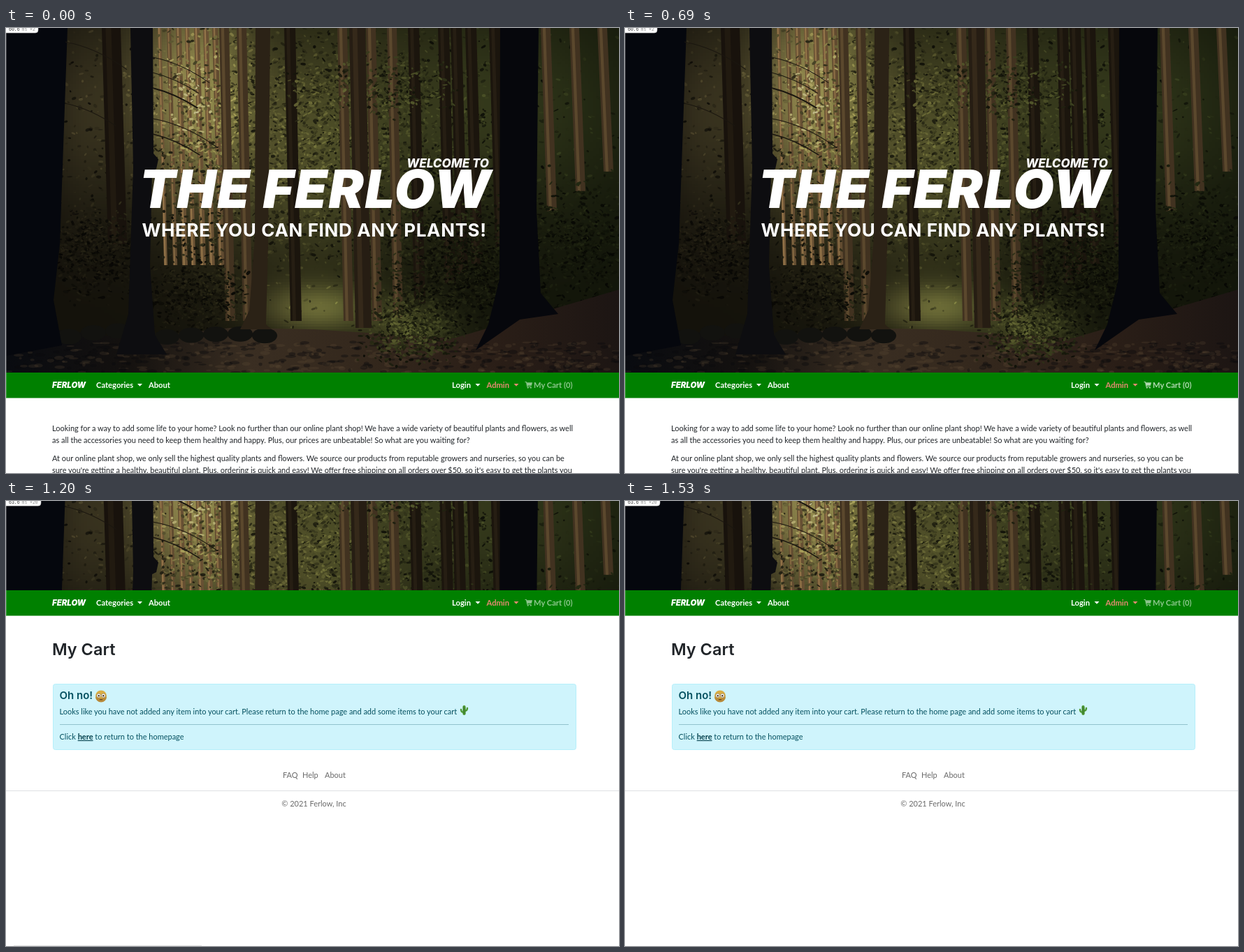
These frames come from a looping animation (877 px wide and 638 px high, 1.56 s). An HTML page with a canvas:

```html
<!DOCTYPE html>
<html lang="en">
<head>
<meta charset="utf-8">
<title>Plant shop</title>
<style>
html, body { margin: 0; width: 100%; height: 100%; overflow: hidden; background: #fff; }
canvas, svg { position: absolute; left: 0; top: 0; }
text { font: 10.97px Lato, sans-serif; white-space: pre; font-optical-sizing: none; }
.inter { font-family: Inter, sans-serif; }
.logo { font-weight: 900; font-style: italic; }
.nav text { font-size: 11.2px; font-weight: 700; }
.nav .logo { font: italic 900 11.4px Inter, sans-serif; }
.foot text { fill: #6a6a6a; }
#badge text { font: 6.5px "Liberation Mono", monospace; }
</style>
</head>
<body>
<canvas id="forest" width="877" height="494"></canvas>
<svg width="877" height="638" viewBox="0 0 877 638">
  <g id="home">
    <g fill="#fff">
      <text class="inter" x="691" y="199.5" text-anchor="end" style="font-size:17px;font-weight:800;font-style:italic">WELCOME TO</text>
      <text class="inter logo" x="443" y="257.5" text-anchor="middle" style="font-size:75px;letter-spacing:1.8px">THE FERLOW</text>
      <text class="inter" x="441" y="299" text-anchor="middle" style="font-size:26px;font-weight:700;letter-spacing:.65px">WHERE YOU CAN FIND ANY PLANTS!</text>
    </g>
    <rect y="530" width="877" height="108" fill="#fff"/>
    <g fill="#212529">
      <text x="66" y="577.5">Looking for a way to add some life to your home? Look no further than our online plant shop! We have a wide variety of beautiful plants and flowers, as well</text>
      <text x="66" y="595">as all the accessories you need to keep them healthy and happy. Plus, our prices are unbeatable! So what are you waiting for?</text>
      <text x="66" y="621">At our online plant shop, we only sell the highest quality plants and flowers. We source our products from reputable growers and nurseries, so you can be</text>
      <text x="66" y="638">sure you're getting a healthy, beautiful plant. Plus, ordering is quick and easy! We offer free shipping on all orders over $50, so it's easy to get the plants you</text>
    </g>
  </g>

  <g id="cart">
    <rect y="164" width="877" height="474" fill="#fff"/>
    <text class="inter" x="66" y="221" fill="#212529" style="font-size:23.5px;font-weight:600">My Cart</text>
    <rect x="67.5" y="262.5" width="748" height="94" rx="3" fill="#cff4fc" stroke="#b6effb"/>
    <g fill="#055160">
      <text class="inter" x="76.5" y="284" style="font-size:15px;font-weight:600">Oh no!</text>
      <text x="76.5" y="305.5">Looks like you have not added any item into your cart. Please return to the home page and add some items to your cart</text>
      <text x="76.5" y="342">Click <tspan font-weight="700" fill="#04414d" text-decoration="underline">here</tspan> to return to the homepage</text>
    </g>
    <path d="M77 320.5H805" stroke="#055160" opacity=".3"/>
    <g transform="translate(136 279.5)">
      <circle r="8" fill="#d9ad45"/>
      <path d="M-8 1A8 8 0 0 0 8 1Q0 6-8 1" fill="#b88a3a"/>
      <g fill="#fff" stroke="#7d6330" stroke-width=".6"><circle cx="-3.3" cy="-.5" r="2.9"/><circle cx="3.3" cy="-.5" r="2.9"/></g>
      <g fill="#4a3018"><circle cx="-3.2" cy="-.3" r="1.2"/><circle cx="3.2" cy="-.3" r="1.2"/><path d="M-2 4.8H2V5.7H-2Z"/></g>
    </g>
    <g fill="none" stroke="#4f9a35" stroke-linecap="round">
      <path d="M655.5 295V305" stroke-width="4.2"/>
      <path d="M655 303Q651 303 651 299M656 301Q660 301 660 297" stroke-width="2.4"/>
      <path d="M654.6 295V305M656.6 296V305" stroke="#2e6c26" stroke-width=".7"/>
    </g>
    <g class="foot">
      <text x="396" y="396.5">FAQ</text><text x="424" y="396.5">Help</text><text x="456" y="396.5">About</text>
      <text x="440.5" y="438" text-anchor="middle">© 2021 Ferlow, Inc</text>
    </g>
    <path d="M0 415.5H877" stroke="#dfe1e3"/>
    <path id="status" d="M11 637.5H280" stroke="#e2e2e2"/>
  </g>

  <g id="nav" class="nav" fill="#fff">
    <rect y="494" width="877" height="36.5" fill="#008000"/>
    <text class="logo" x="66" y="516">FERLOW</text>
    <text x="129" y="516">Categories</text><path d="M188 510h7l-3.5 3.7z"/>
    <text x="204" y="516">About</text>
    <text x="638" y="516">Login</text><path d="M671.5 510h7l-3.5 3.7z"/>
    <g fill="#e58a72"><text x="687.5" y="516">Admin</text><path d="M726.5 510h7l-3.5 3.7z"/></g>
    <g id="link">
      <path d="M742.5 507h2.2l.4 1.3h7.9l-1.1 4.5h-5.8l.2 1h5.2v1h-6.1l-1.4-6.7h-1.5z"/>
      <circle cx="746.7" cy="515.8" r="1"/><circle cx="750.9" cy="515.8" r="1"/>
      <text x="755" y="516">My Cart (0)</text>
    </g>
    <path d="M.5 0V530" stroke="#fff" opacity=".25"/>
  </g>

  <g id="badge">
    <rect id="plate" x="-6" y="-8" width="52" height="15" rx="4" fill="#fff" stroke="#bbb" stroke-width=".6"/>
    <text id="ms" x="4" y="4" fill="#333"></text>
    <text x="22.5" y="4" fill="#999">ms</text>
    <text id="count" x="34" y="4" fill="#888"></text>
  </g>
</svg>
<script>
const $ = id => document.getElementById(id);
const ctx = $('forest').getContext('2d');

let seed = 7;
const rnd = () => (seed = seed * 16807 % 2147483647) / 2147483647;
const spread = () => rnd() + rnd() + rnd() - 1.5;

// Daylight falling through the wood, as a lightness in percent
const bump = (x, y, rx, ry) => Math.exp(-((x / rx) ** 2) - (y / ry) ** 2);
const light = (x, y) => 6
  + 36 * bump(x - 265, y - 90, 85, 150)
  + 15 * bump(x - 430, y - 180, 130, 180)
  + 10 * bump(x - 680, y - 110, 200, 150)
  + 9 * bump(x - 110, y - 120, 60, 140)
  + 22 * bump(x - 445, y - 400, 80, 35)
  + 14 * bump(x - 580, y - 435, 60, 40);
const tone = (x, y, k) => `hsl(${42 + x * .04},${28 + x * .01}%,${light(x, y) * k}%)`;

function shape(fill, ...points) {
  ctx.fillStyle = fill;
  ctx.beginPath();
  for (let i = 0; i < points.length; i += 2) ctx.lineTo(points[i], points[i + 1]);
  ctx.fill();
}

function ellipse(fill, x, y, rx, ry, turn = 0) {
  ctx.fillStyle = fill;
  ctx.beginPath();
  ctx.ellipse(x, y, rx, ry, turn, 0, 7);
  ctx.fill();
}

function leaves(n, cx, cy, rx, ry) {
  while (n--) {
    const x = cx + spread() * rx, y = cy + spread() * ry;
    ellipse(tone(x, y, .3 + rnd() * 1.2), x, y, 1 + rnd() * 3, .8 + rnd() * 1.4, spread());
  }
}

function trunk(x, width, foot, lightness) {
  const lean = 9;
  const slab = (color, a, b) => shape(color, x + a, 0, x + b, 0, x + lean + b, foot, x + lean + a, foot);
  slab(`hsl(33,34%,${lightness}%)`, 0, width);
  slab(`hsl(35,34%,${lightness * 1.4}%)`, width * .2, width * .5);
}

function drawForest() {
  for (let x = 0; x < 877; x += 4)
    for (let y = 0; y < 494; y += 4) {
      ctx.fillStyle = tone(x, y, 1);
      ctx.fillRect(x, y, 4, 4);
    }
  for (let x = 217; x < 300; x += 13) trunk(x, 5 + rnd() * 4, 340, 27 + rnd() * 6);
  leaves(6000, 438, 170, 330, 190);

  const foot = x => 420 - Math.max(0, x - 540) * .7;
  for (const x of [305, 330, 474, 515, 545, 765, 806, 846]) trunk(x, 14, foot(x), 19);
  for (const x of [398, 575, 618, 636, 657, 691]) trunk(x, 16, foot(x), 8);
  trunk(137, 27, 310, 7);

  leaves(500, 520, 85, 110, 40);
  leaves(700, 125, 320, 60, 60);
  leaves(700, 270, 385, 70, 45);
  leaves(1800, 660, 340, 110, 90);
  leaves(700, 830, 310, 70, 90);

  // Ground with a sandy path and earthy right bank
  const earth = ctx.createLinearGradient(0, 0, 877, 0);
  ['#090b10', '#14110f', '#3a2e22', '#33271c', '#2a1e17', '#1c1513']
    .forEach((c, i) => earth.addColorStop(i / 5, c));
  shape(earth, 0, 425, 180, 445, 320, 430, 440, 432, 640, 445, 877, 375, 877, 494, 0, 494);
  for (let i = 0; i < 500; i++) {
    const x = rnd() * 877;
    ellipse(i % 2 ? '#0a0a0d66' : '#6b533a33', x, 450 + rnd() * 44, 2 + rnd() * 6, 1 + rnd() * 2);
  }
  for (let x = 20; x < 400; x += 35) ellipse('#12120f', x, 440 + spread() * 8, 18, 11);

  leaves(900, 580, 430, 65, 45);

  // Nearest trunks
  trunk(491, 23, 430, 11);
  shape('#2b2216', 357, 0, 378, 0, 375, 310, 372, 425, 380, 432, 335, 432, 348, 405, 356, 300);
  shape('#0d0d10', 178, 0, 210, 0, 211, 180, 218, 188, 215, 202, 209, 205, 206, 340, 213, 440, 230, 468, 158, 468, 175, 410, 182, 200);
  shape('#05070d', 0, 0, 88, 0, 77, 310, 68, 390, 80, 455, 0, 470);
  shape('#06070c', 707, 0, 762, 0, 759, 260, 765, 380, 790, 410, 735, 418, 672, 462, 690, 425, 706, 360);

  ctx.strokeStyle = '#1a160f';
  for (let y = 20; y < 170; y += 22) {
    const side = rnd() < .4 ? 85 : 210, reach = 55 + rnd() * 40;
    ctx.lineWidth = 1 + rnd();
    ctx.beginPath();
    ctx.moveTo(side, y);
    ctx.quadraticCurveTo(side + reach / 2, y + 8, side + reach, y + reach * .45);
    ctx.stroke();
  }
}

const clamp = v => Math.min(1, Math.max(0, v));

function frame(now) {
  const t = now % 1560;
  const onCart = t >= 1110;
  const late = t >= 1200;
  $('home').style.display = onCart ? 'none' : '';
  $('cart').style.display = onCart ? '' : 'none';
  $('forest').style.transform = `translateY(${onCart ? -100 : 0}px)`;
  $('nav').setAttribute('transform', `translate(0 ${onCart ? -366 : 0})`);

  const hover = onCart ? 0 : 1 - (1 - clamp((t - 610) / 180)) ** 2;
  $('link').setAttribute('opacity', .55 + .2 * hover);
  $('status').setAttribute('opacity', 1 - clamp((t - 1300) / 200));

  $('ms').textContent = late ? '63.6' : onCart ? '40.1' : '60.6';
  $('count').textContent = late ? '×20' : '×2';
  $('plate').setAttribute('width', late ? 56 : 52);
}

drawForest();
const start = performance.now();
(function loop() {
  frame(performance.now() - start);
  requestAnimationFrame(loop);
})();
</script>
</body>
</html>
```
